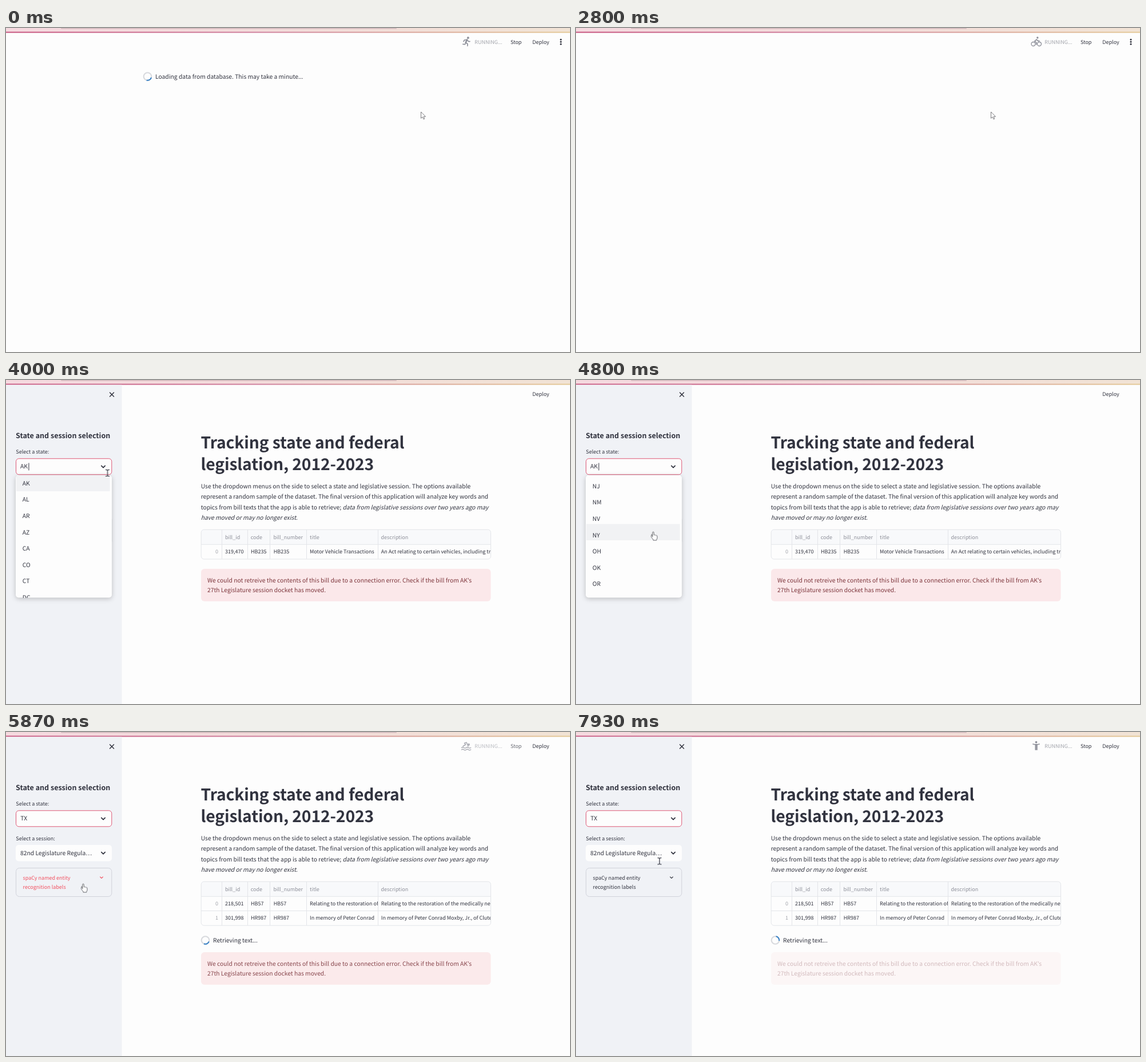
These frames come from a looping animation (986 px wide and 568 px high, 8000 ms). An HTML page:

```html
<!DOCTYPE html>
<html lang="en">
<head>
<meta charset="utf-8">
<title>Legislation tracker</title>
<style>
html, body { margin: 0; width: 100%; height: 100%; overflow: hidden; background: #fdfdfd; }
svg { display: block; width: 986px; height: 568px; color: #31333f; }
text {
  font: 10.31px "Noto Sans CJK SC", "Noto Sans CJK JP", "Noto Sans CJK", sans-serif;
  fill: currentColor; text-rendering: geometricPrecision; white-space: pre;
}
.small text, text.small { font-size: 9.03px; }
.h1 { font-size: 28.3px; font-weight: 700; letter-spacing: -.14px; }
.h2 { font-size: 12.5px; font-weight: 600; }
.line { fill: none; stroke: currentColor; stroke-linecap: round; stroke-linejoin: round; }
.grid { fill: none; stroke: #e3e5e9; }
.muted { color: #8d8f99; }
.faint { color: #a2a4ab; }
.error { color: #7d353b; }

/* One 8 s timeline: 1% = 80 ms */
.tl { animation: 8s step-end infinite; }
.loading { animation-name: loading; }
.done { animation-name: done; }
.first-run { animation-name: first-run; }
.second-run { animation-name: second-run; animation-timing-function: linear; }
.page { animation-name: page; }
.fetching { animation-name: fetching; }
.failed { animation-name: failed; }
.stale { animation-name: stale; }
.before { animation-name: before; }
.after { animation-name: after; }
.focus { animation-name: focus; }
.popup { animation-name: popup; }
.first-state { animation-name: first-state; }
.second-state { animation-name: second-state; }
.hover { animation-name: hover; }
.list { animation-name: scroll; animation-timing-function: linear; }
.top-option { animation-name: top-option; }
.hover-option { animation-name: hover-option; }
.pointer { animation-name: move; animation-timing-function: ease-in-out; }
.arrow { animation-name: arrow; }
.beam { animation-name: beam; }
.hand { animation-name: hand; }
.arc { animation: spin 8s linear infinite; }
.caret { animation: blink 1s step-end infinite; animation-delay: var(--d); }
.icons > * { animation: icon .8s step-end infinite; animation-delay: calc(var(--i) * 200ms - 800ms - var(--o)); }

@keyframes loading { 0% { opacity: 1 } 6.25%, 100% { opacity: 0 } }
@keyframes done { 0%, 24.4%, 100% { opacity: 0 } 6.25% { opacity: 1 } }
@keyframes first-run { 0% { opacity: 1 } 45%, 100% { opacity: 0 } }
@keyframes second-run { 0%, 67.8% { opacity: 0 } 75.5%, 100% { opacity: 1 } }
@keyframes page { 0% { opacity: 0 } 37.5%, 100% { opacity: 1 } }
@keyframes fetching { 0% { opacity: 1 } 45%, 100% { opacity: 0 } }
@keyframes failed { 0%, 71.25%, 100% { opacity: 0 } 45% { opacity: 1 } }
@keyframes stale {
  0% { opacity: 0 } 71.25% { opacity: 1 }
  72% { opacity: 1; animation-timing-function: linear } 83%, 100% { opacity: .33 }
}
@keyframes before { 0% { opacity: 1 } 71.25%, 100% { opacity: 0 } }
@keyframes after { 0% { opacity: 0 } 71.25%, 100% { opacity: 1 } }
@keyframes focus { 0% { opacity: 0 } 45.7%, 100% { opacity: 1 } }
@keyframes popup { 0%, 66.25%, 100% { opacity: 0 } 46.25% { opacity: 1 } }
@keyframes first-state { 0% { opacity: 1 } 66.25%, 100% { opacity: 0 } }
@keyframes second-state { 0% { opacity: 0 } 66.25%, 100% { opacity: 1 } }
@keyframes hover { 0%, 76.9%, 100% { color: #31333f } 66.25% { color: #f2505f } }
@keyframes scroll {
  0% { transform: none } 55% { transform: none; animation-timing-function: ease-in-out }
  62.5%, 100% { transform: translateY(-1144px) }
}
@keyframes top-option { 0% { opacity: 1 } 54.5%, 100% { opacity: 0 } }
@keyframes hover-option { 0% { opacity: 0 } 54.5%, 100% { opacity: 1 } }
@keyframes move {
  0%, 36.5% { transform: translate(725px, 147px) }
  44.5%, 53% { transform: translate(177.5px, 163px) }
  54.5%, 75.5% { transform: translate(135px, 266.5px) }
  77.5%, 100% { transform: translate(146px, 226.3px) }
}
@keyframes arrow { 0% { opacity: 1 } 43%, 100% { opacity: 0 } }
@keyframes beam { 0%, 54% { opacity: 0 } 43%, 76.9%, 100% { opacity: 1 } }
@keyframes hand { 0%, 76.9%, 100% { opacity: 0 } 54% { opacity: 1 } }
@keyframes spin { from { rotate: var(--a) } to { rotate: calc(var(--a) + 2400deg) } }
@keyframes blink { 0% { opacity: 1 } 50%, 100% { opacity: 0 } }
@keyframes icon { 0% { opacity: 1 } 25%, 100% { opacity: 0 } }
</style>
</head>
<body>
<svg viewBox="0 0 986 568">
  <defs>
    <linearGradient id="chrome"><stop stop-color="#f5d9df"/><stop offset=".5" stop-color="#f3dcda"/><stop offset="1" stop-color="#f1e3d5"/></linearGradient>
    <linearGradient id="strip"><stop stop-color="#c6507b"/><stop offset=".45" stop-color="#cf7f9b"/><stop offset="1" stop-color="#e3c793"/></linearGradient>
    <clipPath id="list-clip"><rect x="17" y="167" width="168" height="214.5" rx="5"/></clipPath>
    <clipPath id="title-clip"><rect x="526" y="288" width="124" height="52"/></clipPath>
    <clipPath id="text-clip"><rect x="651" y="288" width="196.5" height="52"/></clipPath>

    <g id="person">
      <circle cx="804.5" cy="17.8" r="1.9" fill="currentColor"/>
      <path class="line" stroke-width="1.7" d="M799 21.2Q804.5 22.6 810 21.2"/>
      <path class="line" stroke-width="2" d="M803.5 22.5V31M805.7 22.5V31"/>
    </g>
    <g id="runner">
      <circle cx="807.8" cy="17.2" r="1.9" fill="currentColor"/>
      <path class="line" stroke-width="2.6" d="M806 20.5L803.8 25"/>
      <path class="line" stroke-width="1.6" d="M806 20.5L801.5 21L800 23.7M806.7 21.5L808.5 23.6L811 23.6M803.8 25.5L807 28L806.8 31.5M803.6 25.5L802.5 28.8L798.8 28.4"/>
    </g>
    <g id="swimmer">
      <circle cx="809" cy="22" r="1.9" fill="currentColor"/>
      <path class="line" stroke-width="1.6" d="M799 25L803.5 22L801.5 19.5L805 18.2L808 25M796.5 27.5q2-1.6 4 0t4 0t4 0t4 0M796.5 31q2-1.6 4 0t4 0t4 0t4 0"/>
    </g>
    <g id="cyclist">
      <circle cx="806.8" cy="17" r="1.7" fill="currentColor"/>
      <path class="line" stroke-width="1.3" d="M803 28a3.5 3.5 0 1 1-7 0a3.5 3.5 0 1 1 7 0M813.5 28a3.5 3.5 0 1 1-7 0a3.5 3.5 0 1 1 7 0"/>
      <path class="line" stroke-width="1.6" d="M810 22.6H807.6L805.2 20.2L801.8 23.2L804.8 25.4V29"/>
    </g>
    <g id="status">
      <text class="small faint" x="819.3" y="27.7">RUNNING...</text>
      <text class="small" x="882" y="27.7">Stop</text>
    </g>
    <g id="ring">
      <circle r="6.8" fill="none" stroke="#d8dade" stroke-width="2.1"/>
    </g>
    <path id="wedge" class="line" stroke-width="2.1" style="color:#3a82c6;stroke-linecap:butt" d="M-4.8-4.8A6.8 6.8 0 0 1 4.8-4.8"/>
    <path id="chevron" class="line" stroke-width="1.7" d="M-3.2-1.6L0 1.6L3.2-1.6"/>
    <g id="failure" class="error">
      <rect x="341" y="331" width="506.5" height="57" rx="6" fill="#fbe8ea"/>
      <text x="352" y="354.8">We could not retreive the contents of this bill due to a connection error. Check if the bill from AK's</text>
      <text x="352" y="372.3">27th Legislature session docket has moved.</text>
    </g>
  </defs>

  <rect width="986" height="568" fill="#fdfdfd"/>
  <rect width="986" height="6.5" fill="url(#chrome)"/>
  <rect x="96" width="587" height="1.4" rx=".7" fill="#d3b9bd"/>
  <rect y="6.5" width="986" height="2" fill="url(#strip)"/>

  <text class="small" x="920.3" y="27.7">Deploy</text>
  <g class="tl first-run">
    <use href="#status"/>
    <g class="icons muted" style="--o:300ms"></g>
    <g fill="currentColor"><circle cx="970" cy="20.2" r="1.5"/><circle cx="970" cy="24.2" r="1.5"/><circle cx="970" cy="28.2" r="1.5"/></g>
  </g>
  <g class="tl second-run">
    <use href="#status"/>
    <g class="icons muted" style="--o:150ms"></g>
  </g>

  <g class="tl loading">
    <g transform="translate(247.5 85)"><use href="#ring"/><g class="arc" style="--a:150deg"><use href="#wedge"/></g></g>
    <text x="261" y="88.7">Loading data from database. This may take a minute...</text>
  </g>
  <g class="tl done">
    <rect x="239.5" y="75.5" width="507" height="40" rx="6" fill="#e6f8ea"/>
    <text x="251" y="99.8" style="color:#2b6a3b">Done!</text>
  </g>

  <g class="tl page">
    <rect y="8.5" width="202.5" height="559.5" fill="#f0f2f6"/>
    <path class="line" stroke-width="1.5" d="M181.5 22L188.5 29M188.5 22L181.5 29"/>
    <text class="h2" x="17" y="101.8">State and session selection</text>
    <text class="small" x="17.3" y="129.3">Select a state:</text>
    <rect x="17" y="137.5" width="168" height="28.5" rx="5" fill="#fdfdfd"/>
    <rect class="tl focus" x="17.5" y="137.8" width="167.3" height="28" rx="5" fill="none" stroke="#dc5674"/>
    <g class="tl first-state"><text x="25" y="155.4">AK</text></g>
    <g class="tl second-state">
      <text x="25.3" y="155.4">TX</text>
      <rect class="caret" style="--d:-700ms" x="38.6" y="145.5" width="1" height="13" fill="#31333f"/>
    </g>
    <use href="#chevron" x="170" y="152"/>

    <text class="small" x="17.3" y="189.6">Select a session:</text>
    <rect x="17" y="198" width="168" height="28.5" rx="5" fill="#fdfdfd"/>
    <text class="tl before" x="25" y="215.8">27th Legislature</text>
    <text class="tl after" x="25" y="215.8">82nd Legislature Regula…</text>
    <use href="#chevron" x="170" y="212.3"/>

    <rect x="17.5" y="238.5" width="167.3" height="50" rx="6" fill="none" stroke="#d0d2da"/>
    <g class="tl hover small">
      <text x="29.5" y="258.7">spaCy named entity</text>
      <text x="29.5" y="274.8">recognition labels</text>
      <path class="line" stroke-width="1.1" d="M164.6 254L167 256.3L169.4 254"/>
    </g>

    <text class="h1" x="340.5" y="120">Tracking state and federal</text>
    <text class="h1" x="340.5" y="158">legislation, 2012-2023</text>
    <text x="340.7" y="189.7">Use the dropdown menus on the side to select a state and legislative session. The options available</text>
    <text x="340.7" y="208.1">represent a random sample of the dataset. The final version of this application will analyze key words and</text>
    <text x="340.7" y="226.6">topics from bill texts that the app is able to retrieve; <tspan font-style="italic">data from legislative sessions over two years ago may</tspan></text>
    <text x="340.7" y="245"><tspan font-style="italic">have moved or may no longer exist</tspan>.</text>

    <path d="M341 288V267a5 5 0 0 1 5-5H842.5a5 5 0 0 1 5 5V288Z" fill="#f8f9fb"/>
    <g class="small muted">
      <text x="383" y="278.7">bill_id</text>
      <text x="427.7" y="278.7">code</text>
      <text x="467.5" y="278.7">bill_number</text>
      <text x="531" y="278.7">title</text>
      <text x="655.5" y="278.7">description</text>
    </g>
    <g class="tl before small" id="rows-before"></g>
    <g class="tl after small" id="rows-after"></g>

    <g class="tl fetching">
      <g transform="translate(348.5 340)"><use href="#ring"/><g class="arc" style="--a:195deg"><use href="#wedge"/></g></g>
      <text x="362" y="343.8">Retrieving text...</text>
    </g>
    <g class="tl failed"><use href="#failure"/></g>
    <g class="tl after">
      <g transform="translate(348.5 365)"><use href="#ring"/><g class="arc" style="--a:195deg"><use href="#wedge"/></g></g>
      <text x="362" y="368.8">Retrieving text...</text>
    </g>
    <g class="tl stale"><use href="#failure" y="55"/></g>

    <g class="tl popup">
      <rect class="caret" style="--d:-300ms" x="39.4" y="145.5" width="1" height="13" fill="#31333f"/>
      <rect x="17" y="167" width="168" height="214.5" rx="5" fill="#fdfdfd" style="filter:drop-shadow(0 2px 4px rgba(0,0,0,.22))"/>
      <g clip-path="url(#list-clip)">
        <rect class="tl top-option" x="18" y="167" width="163.5" height="28" fill="#f1f2f4"/>
        <rect class="tl hover-option" x="18" y="252.5" width="163.5" height="28.5" fill="#f1f2f4"/>
        <g class="tl list" id="options"></g>
      </g>
    </g>
  </g>

  <g class="tl pointer">
    <path class="tl arrow" d="M.5 0V11.3L3.2 8.9L5 13L6.8 12.2L5 8.3H8.5Z" fill="#fff" stroke="#6e6e72" stroke-width=".9"/>
    <path class="tl beam line" stroke-width="1.2" d="M-3-5.7Q-.6-5.7 0-4.8Q.6-5.7 3-5.7M0-4.8V4.8M-3 5.7Q-.6 5.7 0 4.8Q.6 5.7 3 5.7"/>
    <path class="tl hand" fill="#fff" stroke="#55565c" stroke-width=".9" stroke-linejoin="round" d="M-1.2 8.4V1Q-1.2-.2 0-.2T1.2 1V5.2Q2.6 4.5 3.4 5.6Q4.8 5 5.4 6.2Q7 5.8 7 7.4V10.5Q7 12 5.8 13.2V14.5H0V13Q-2.6 10.6-3.6 8.4Q-3-.0-1.2 8.4Z"/>
  </g>
</svg>
<script>
const $ = id => document.getElementById(id);
const label = (x, y, content, extra = "") => `<text x="${x}" y="${y}" ${extra}>${content}</text>`;

const icons = ["person", "runner", "swimmer", "cyclist"];
for (const group of document.querySelectorAll(".icons"))
  group.innerHTML = icons.map((name, i) => `<g style="--i:${i}"><use href="#${name}"/></g>`).join("");

function drawRows(group, rows) {
  const bottom = 288.5 + 25.2 * rows.length;
  const cells = rows.map(([id, code, title, description], i) => {
    const y = 303.9 + 25.2 * i;
    return label(371, y, i, 'class="faint" text-anchor="end"') + label(383, y, id) +
      label(427.9, y, code) + label(467.7, y, code) +
      label(531, y, title, 'clip-path="url(#title-clip)"') +
      label(655.8, y, description, 'clip-path="url(#text-clip)"');
  });
  const columns = [377.5, 422.5, 461.5, 525.5, 650.5].map(x => `M${x} 262V${bottom}`).join("");
  const lines = rows.map((_, i) => `M341 ${288.3 + 25.2 * i}H847.5`).join("");
  group.innerHTML = cells.join("") + `<path class="grid" d="${columns}${lines}"/>` +
    `<rect class="grid" x="341.2" y="262.3" width="506.3" height="${bottom - 262}" rx="5"/>`;
}
drawRows($("rows-before"), [
  ["319,470", "HB235", "Motor Vehicle Transactions", "An Act relating to certain vehicles, including trailers"]
]);
drawRows($("rows-after"), [
  ["218,501", "HB57", "Relating to the restoration of the", "Relating to the restoration of the medically needy"],
  ["301,998", "HR987", "In memory of Peter Conrad", "In memory of Peter Conrad Moxby, Jr., of Clute"]
]);

const states = ("AK AL AR AZ CA CO CT DC DE FL GA HI IA ID IL IN KS KY LA MA MD ME MI MN MO MS MT " +
  "NC ND NE NH NJ NM NV NY OH OK OR PA RI SC SD TN TX US UT VA VT WA WI WV WY").split(" ");
$("options").innerHTML = states.map((name, i) => label(28.8, 184.7 + 28.6 * i, name)).join("");
</script>
</body>
</html>
```
